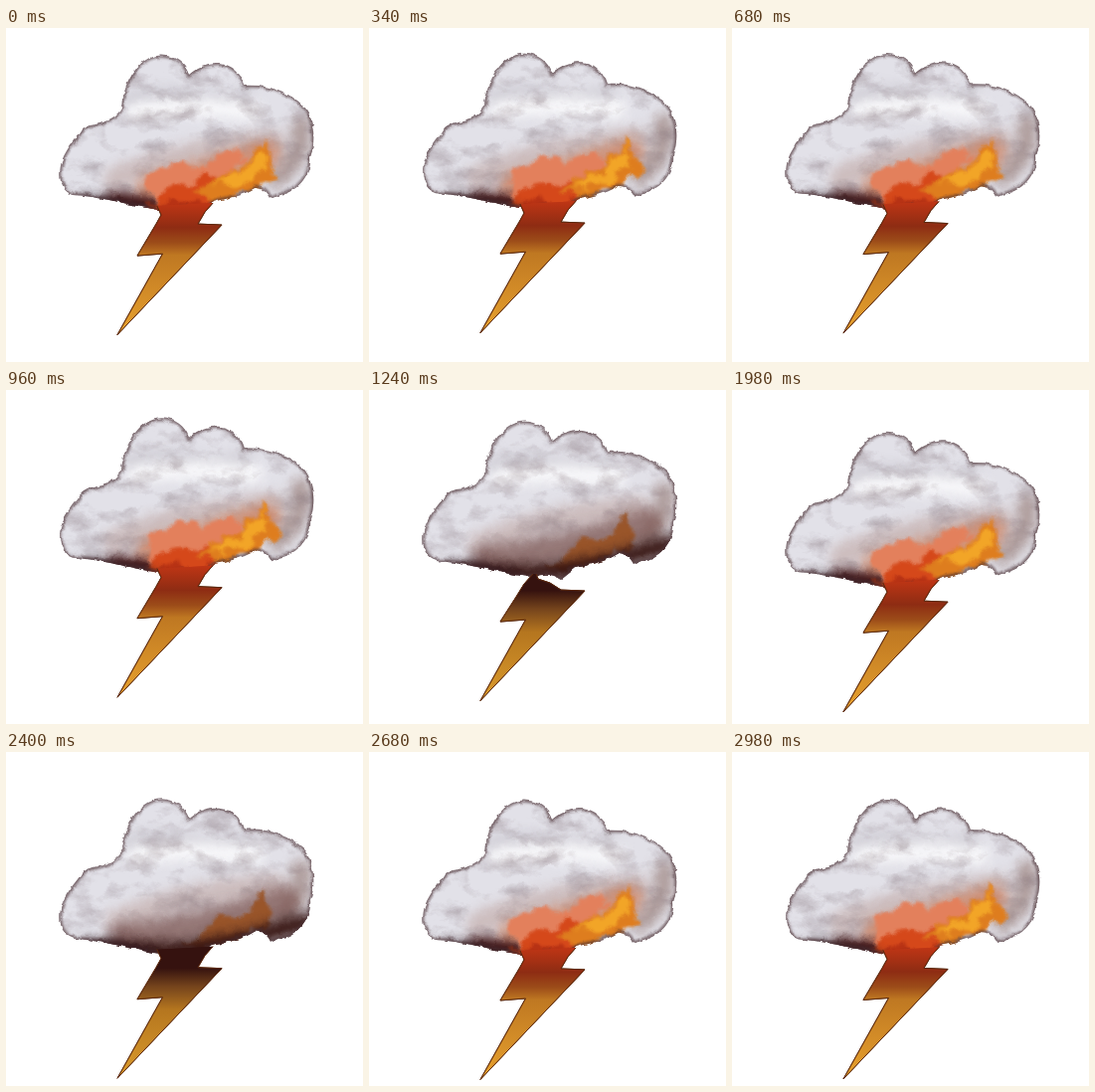
Recreate the animation shown at these times as an HTML page. Size 359 by 336 pixels, loop 3 s.

```html
<!DOCTYPE html>
<html lang="en">
<head>
<meta charset="utf-8">
<title>Storm cloud</title>
<style>
html, body { margin: 0; width: 100%; height: 100%; overflow: hidden; background: #fff; }
svg { display: block; width: 359px; height: 336px; }
.soft { filter: url(#soft); fill: none; stroke-linecap: round; }
.wash { filter: url(#wash); }
</style>
</head>
<body>
<svg viewBox="0 0 359 336">
  <defs>
    <filter id="rough" filterUnits="userSpaceOnUse" width="359" height="336" color-interpolation-filters="sRGB">
      <feTurbulence type="fractalNoise" baseFrequency=".1" numOctaves="3" result="n"/>
      <feDisplacementMap in="SourceGraphic" in2="n" scale="5" xChannelSelector="R" yChannelSelector="G"/>
    </filter>
    <filter id="wash" filterUnits="userSpaceOnUse" width="359" height="336" color-interpolation-filters="sRGB">
      <feTurbulence type="fractalNoise" baseFrequency=".05" numOctaves="4" result="n"/>
      <feDisplacementMap in="SourceGraphic" in2="n" scale="26" xChannelSelector="R" yChannelSelector="G"/>
      <feGaussianBlur stdDeviation="1.8"/>
    </filter>
    <filter id="soft" filterUnits="userSpaceOnUse" width="359" height="336" color-interpolation-filters="sRGB">
      <feGaussianBlur stdDeviation="6"/>
    </filter>
    <filter id="edge" filterUnits="userSpaceOnUse" width="359" height="336" color-interpolation-filters="sRGB">
      <feGaussianBlur stdDeviation="1.5"/>
    </filter>
    <filter id="mottle" filterUnits="userSpaceOnUse" width="359" height="336" color-interpolation-filters="sRGB">
      <feTurbulence type="fractalNoise" baseFrequency=".03 .05" numOctaves="5"/>
      <feColorMatrix values="0 0 0 0 .5  0 0 0 0 .43  0 0 0 0 .46  2 0 0 0 -.9"/>
    </filter>
    <linearGradient id="lit" gradientUnits="userSpaceOnUse" x1="0" y1="168" x2="0" y2="307">
      <stop offset=".05" stop-color="#bd3515"/>
      <stop offset=".22" stop-color="#8e2c13"/>
      <stop offset=".33" stop-color="#9c4c19"/>
      <stop offset=".42" stop-color="#bf7822"/>
      <stop offset="1" stop-color="#e8a22e"/>
    </linearGradient>
    <linearGradient id="dark" gradientUnits="userSpaceOnUse" x1="0" y1="168" x2="0" y2="307">
      <stop offset=".2" stop-color="#35120f"/>
      <stop offset=".33" stop-color="#74431c"/>
      <stop offset=".5" stop-color="#b5761f"/>
      <stop offset="1" stop-color="#dc9c2c"/>
    </linearGradient>
    <path id="cloud" d="M116 79C117 60 130 25 157 25.500C170 26 180 33 184 45C194 36 204 34 213 34
      C226 34 236 44 239 56C262 54 284 62 299 76C310 88 312 112 306 128C308 145 292 164 275 166
      L266 170C262 162 256 158 250 159C238 167 220 170 208 173L193 185Q180 176 168 182
      C140 182 115 170 68 166C54 162 52 146 56 132C62 116 72 108 76 100C88 90 106 96 116 79Z"/>
    <clipPath id="clip"><use href="#cloud"/></clipPath>
  </defs>

  <g id="all">
    <g filter="url(#rough)">
      <g clip-path="url(#clip)">
        <rect width="359" height="336" fill="#e2e1e8"/>
        <g class="soft">
          <path d="M122 70Q150 58 180 66T244 64" stroke="#bdbac2" stroke-width="10" opacity=".6"/>
          <path d="M130 82Q180 74 250 82" stroke="#f8f8fa" stroke-width="18"/>
          <path d="M110 150Q170 122 270 112" stroke="#bfa6a2" stroke-width="24" opacity=".6"/>
          <path d="M296 95Q302 125 272 150" stroke="#8a6d67" stroke-width="18" opacity=".6"/>
        </g>
        <rect width="359" height="336" filter="url(#mottle)" opacity=".5"/>

        <g id="ember">
          <path class="soft" d="M120 165Q190 158 280 128" stroke="#7b5450" stroke-width="30" opacity=".75"/>
          <g class="wash">
            <path d="M178 172L215 145L240 142L258 114L272 145L250 162L214 176Z" fill="#9a5222" opacity=".9"/>
          </g>
          <path class="soft" d="M100 177Q190 182 250 164T300 150" stroke="#34120f" stroke-width="18"/>
        </g>
        <g id="fire">
          <path class="soft" d="M145 160Q200 145 262 125" stroke="#cc8262" stroke-width="28" opacity=".8"/>
          <path class="soft" d="M108 172Q135 172 160 180" stroke="#45110f" stroke-width="16"/>
          <g class="wash">
            <path d="M139 152L170 131L198 135L228 122L240 130L226 152L150 176Z" fill="#e3805c"/>
            <path d="M138 174L165 160L200 150L222 166L204 194H155Z" fill="#d5481a"/>
            <path d="M190 162L238 138L260 110L273 148L250 160L214 172Z" fill="#de7d1e"/>
            <path d="M204 160L244 138L259 117L263 138L244 154Z" fill="#f2a527"/>
            <path d="M148 180L178 172L206 174L200 196H150Z" fill="#b73214"/>
          </g>
        </g>
        <path class="soft" d="M80 173Q115 174 148 186" stroke="#260d14" stroke-width="12"/>
        <use href="#cloud" fill="none" stroke="#4a3034" stroke-width="4" opacity=".75" filter="url(#edge)"/>
      </g>
    </g>
    <path id="bolt" fill="url(#lit)" stroke="#5c2a10" stroke-linejoin="round"/>
    <use id="shade" href="#bolt"/>
  </g>
</svg>
<script>
const LOOP = 3000, STEP = 20, HOLD = 160, PAINTINGS = 4;
const $ = id => document.getElementById(id);
const noises = document.querySelectorAll("feTurbulence");

const body = "L132 227L157.500 225L112 306.500L217 196L193 195";
const joined = `M152 177L156 186L151 195${body}L200 183L208 174`;
const split = `M165 179L156 189L148 202${body}L182 188L170 184L168 179`;

// four paintings take turns; the last one has no fire
function paint(index, broken) {
  const dark = index === PAINTINGS - 1;
  noises.forEach((n, i) => n.setAttribute("seed", 10 * index + i + 3));
  $("bolt").setAttribute("d", dark && broken ? split : joined);
  $("bolt").setAttribute("fill", `url(#${dark ? "dark" : "lit"})`);
  $("fire").setAttribute("opacity", dark ? 0 : 1);
  $("ember").setAttribute("opacity", dark ? 1 : 0);
}

let shown;
function draw() {
  let t = performance.now() % LOOP;
  t -= t % STEP;
  const sink = 11.5 * (1 - Math.cos(Math.PI * (t - 450) / 2300));
  $("all").setAttribute("transform", `translate(0 ${sink.toFixed(2)})`);
  const turn = Math.floor(t / HOLD);
  if (turn !== shown) paint(turn % PAINTINGS, t < LOOP / 2);
  shown = turn;
  requestAnimationFrame(draw);
}
draw();
</script>
</body>
</html>
```
